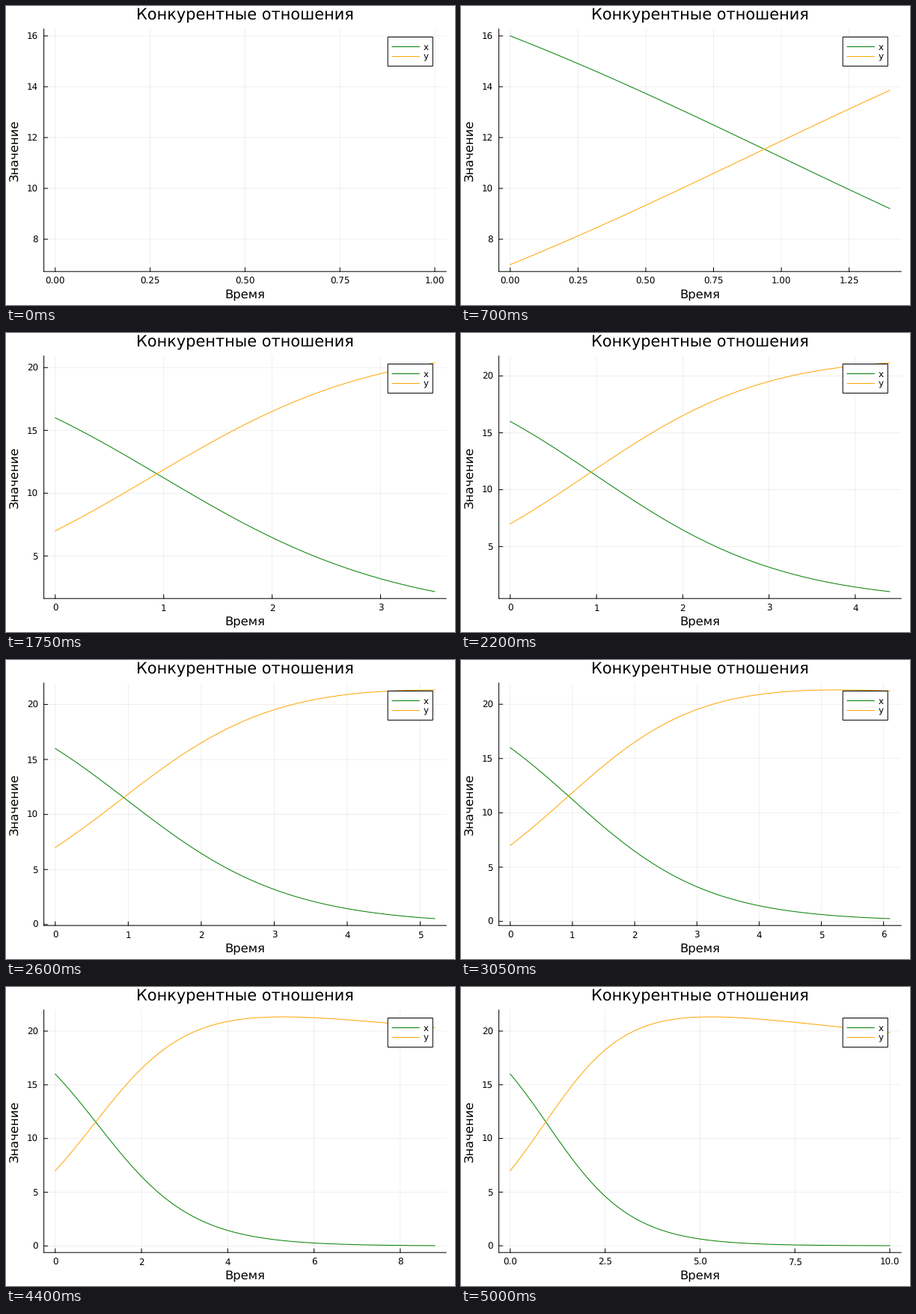
Animation, 600 px wide and 400 px high, one loop 5050 ms. Source, as a matplotlib script:

```python
import math
import numpy as np
import matplotlib.pyplot as plt
from matplotlib.animation import FuncAnimation
from matplotlib.patches import Rectangle

W, H, DPI = 600, 400, 100
FRAMES, DT = 101, 0.1
LEFT, RIGHT, TOP, BOTTOM = 50.6, 588.2, 30.8, 355.2
PAD = 0.03
PX = 72 / DPI  # points per pixel
BIG, MID, SMALL = 20.83, 16.37, 11.9  # text sizes in pixels
GREEN, ORANGE = "#008000", "#ffa500"
STEPS = [(1.0, 1.0), (5.0, 0.9), (2.0, 0.7), (2.5, 0.5), (3.0, 0.2)]

plt.rcParams["font.family"] = "DejaVu Sans"
plt.rcParams["text.hinting"] = "none"


def rate(s):
    x, y = s
    return np.array([0.02 * x - 0.04 * x * y, -0.02 * y + 0.04 * x * y])


def solve(start, sub=10):
    """Runge-Kutta solution sampled every DT."""
    s, h = np.array(start, float), DT / sub
    out = [s]
    for _ in range(FRAMES - 1):
        for _ in range(sub):
            a = rate(s)
            b = rate(s + h / 2 * a)
            c = rate(s + h / 2 * b)
            d = rate(s + h * c)
            s = s + h / 6 * (a + 2 * b + 2 * c + d)
        out.append(s)
    return np.array(out)


def nice_ticks(lo, hi, kmin=4, kmax=8, ideal=5):
    """Scored search for round tick values inside [lo, hi]."""
    span = hi - lo
    best, ticks, best_step = -math.inf, [], 1
    z = math.ceil(math.log10(span))
    while 2 * kmax * 10.0 ** (z + 1) > span:
        for k in range(kmin, 2 * kmax + 1):
            for q, nice in STEPS:
                step = q * 10.0 ** z
                width = (k - 1) * step
                if width >= 2 * span:
                    continue
                r = math.ceil((hi - width) / step)
                while r * step <= lo:
                    vals = [(r + i) * step for i in range(k)]
                    vals = [v for v in vals if lo <= v <= hi]
                    n = len(vals)
                    if kmin <= n <= kmax:
                        grain = 1 - abs(n - ideal) / ideal
                        zero = r <= 0 and -r < k
                        cover = 1.5 * span / ((n - 1) * step)
                        score = grain / 4 + zero / 6 + cover / 3 + nice / 4
                        if score > best + 1e-9:
                            best, ticks, best_step = score, vals, step
                    r += 1
        z -= 1
    digits = 0
    while abs(best_step - round(best_step, digits)) > 1e-9:
        digits += 1
    return ticks, [f"{v:.{digits}f}" for v in ticks]


def padded(lo, hi):
    m = PAD * (hi - lo)
    return lo - m, hi + m


times = np.arange(FRAMES) * DT
path = solve([16, 7])

fig = plt.figure(figsize=(W / DPI, H / DPI), dpi=DPI, facecolor="white")
ax = fig.add_axes([0, 0, 1, 1])
ax.set_xlim(0, W)
ax.set_ylim(H, 0)
ax.axis("off")


def line(xs, ys, color="black", width=1.0, z=2, **kw):
    return ax.plot(xs, ys, color=color, lw=width * PX, zorder=z,
                   snap=False, **kw)[0]


def grid(xs, ys):
    return line(xs, ys, width=0.6, z=1, alpha=0.1)


def text(x, y, s, size, ha="center", z=4, **kw):
    return ax.text(x, y, s, fontsize=size * PX, ha=ha, va="baseline",
                   color="black", zorder=z, **kw)


mid_x, mid_y = (LEFT + RIGHT) / 2, (TOP + BOTTOM) / 2
text(mid_x, 18, "Конкурентные отношения", BIG)
text(mid_x, 391.6, "Время", MID)
text(17.1, mid_y - 0.5, "Значение", MID, rotation=90, rotation_mode="anchor")

line([LEFT, LEFT], [TOP, BOTTOM], z=4)
line([LEFT, RIGHT], [BOTTOM, BOTTOM], z=4)

ax.add_patch(Rectangle((510.2, 41.5), 60.1, 38.9, fc="white", ec="black",
                       lw=PX, zorder=5, snap=False))
for y, name, color in [(54.5, "x", GREEN), (67.5, "y", ORANGE)]:
    line([516, 552.3], [y, y], color, z=6)
    text(557.4, y + 4.1, name, SMALL, "left", 6)

curve_x = line([], [], GREEN, z=3)
curve_y = line([], [], ORANGE, z=3)
marks = []


def init():
    while marks:
        marks.pop().remove()
    curve_x.set_data([], [])
    curve_y.set_data([], [])
    return []


def draw(i):
    init()
    t, s = times[:i + 1], path[:i + 1]
    x0, x1 = padded(0, t[-1] if i else 1)
    y0, y1 = padded(s.min(), s.max())

    def px(v):
        return LEFT + (v - x0) / (x1 - x0) * (RIGHT - LEFT)

    def py(v):
        return BOTTOM - (v - y0) / (y1 - y0) * (BOTTOM - TOP)

    for v, label in zip(*nice_ticks(x0, x1)):
        p = px(v)
        marks.append(grid([p, p], [TOP, BOTTOM]))
        marks.append(line([p, p], [BOTTOM - 5, BOTTOM], z=4))
        marks.append(text(p, 371.6, label, SMALL))
    for v, label in zip(*nice_ticks(y0, y1)):
        p = py(v)
        marks.append(grid([LEFT, RIGHT], [p, p]))
        marks.append(line([LEFT, LEFT + 5], [p, p], z=4))
        marks.append(text(43, p + 4.4, label, SMALL, "right"))

    if i:
        curve_x.set_data(px(t), py(s[:, 0]))
        curve_y.set_data(px(t), py(s[:, 1]))
    return []


anim = FuncAnimation(fig, draw, frames=FRAMES, init_func=init, interval=50,
                     repeat=True, repeat_delay=0, blit=False)
plt.show()
```
